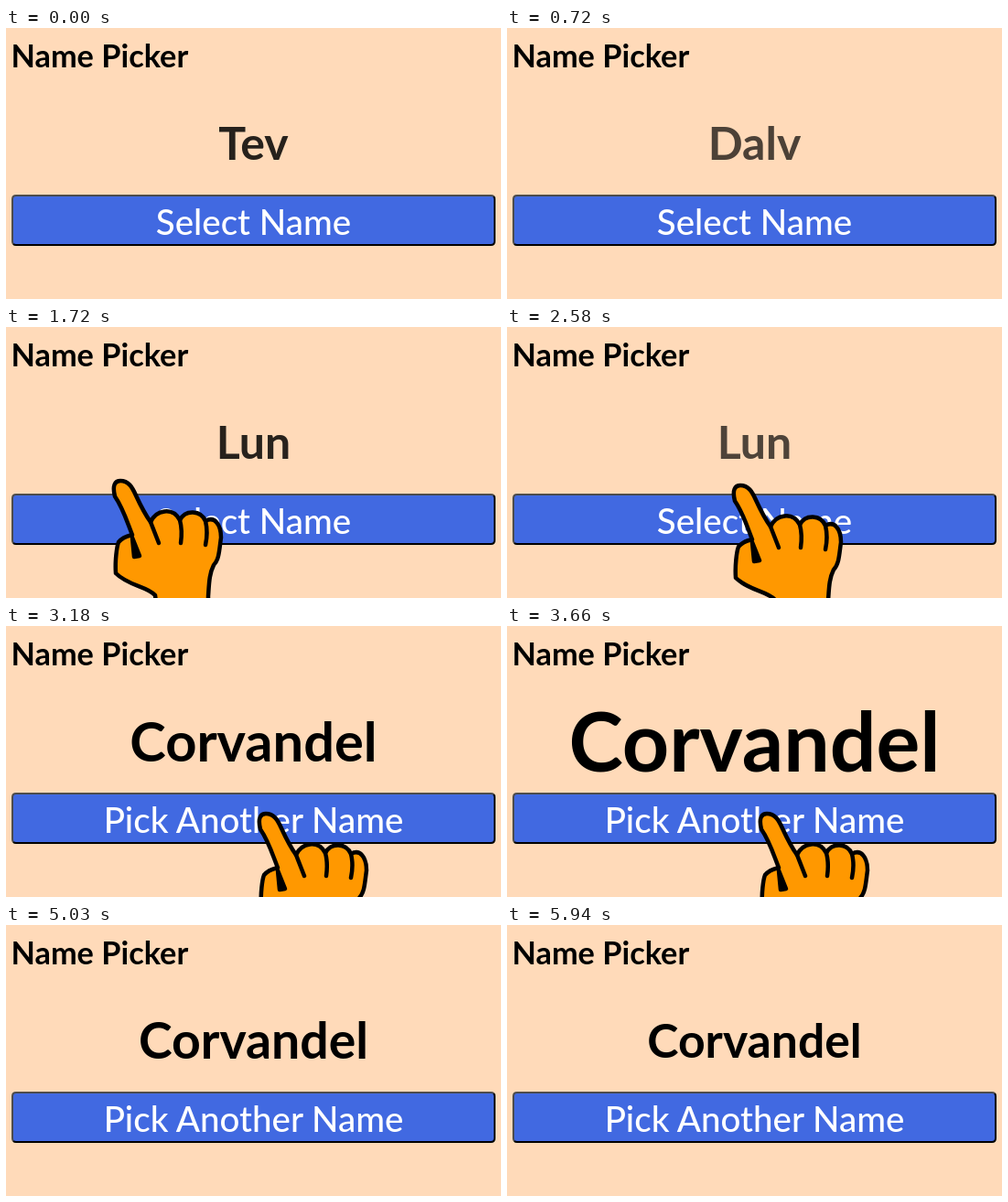
Animation, 541 px wide and 296 px high, one loop 5960 ms. Source, as an HTML page:

```html
<!DOCTYPE html>
<html lang="en">
<head>
<meta charset="utf-8">
<title>Name Picker</title>
<style>
  html, body { margin: 0; width: 100%; height: 100%; overflow: hidden; background: #ffdab9; }
  svg { display: block; width: 541px; height: 296px; font-family: Lato, sans-serif; }
  .bold { font-weight: 700; }
  .mid { text-anchor: middle; }
</style>
</head>
<body>
<svg viewBox="0 0 541 296">
  <text class="bold" x="5.5" y="43" font-size="34.3">Name Picker</text>
  <g id="zoom"><text id="name" class="bold mid" y="19" font-size="50"></text></g>

  <rect x="7" y="183" width="527" height="54" rx="4" fill="#4169e1"/>
  <g fill="none" stroke-width="2">
    <path id="topEdge" d="M8 236 Q7 235 7 233 V187 Q7 183 11 183 H530 Q532 183 533 184"/>
    <path id="bottomEdge" d="M533 184 Q534 185 534 187 V233 Q534 237 530 237 H11 Q9 237 8 236"/>
  </g>
  <text id="label" class="mid" x="270.5" y="226" font-size="38.5" font-weight="500" fill="#fff"></text>

  <g id="hand" stroke="#000" stroke-width="4.5" stroke-linejoin="round" stroke-linecap="round">
    <path fill="#ff9800" d="M3 19 C0 7 3 2 9 2 C18 2 22 9 26 18 C32 31 37 40 42 47
      C48 34 66 30 74 45 C80 33 97 34 102 46 C112 40 119 50 119 64 C117 78 117 88 111 94
      C106 104 106 114 105 128 V165 H52 L47 127 C38 117 18 117 4 103 C3 90 5 74 7 69
      C12 63 18 62 22 61 C16 46 12 32 3 19Z"/>
    <path fill="none" d="M42 47 L51 70 M74 45 Q77 56 75 70 M102 46 Q105 58 102 72"/>
    <path d="M22 64 L30 84 L24 85Z"/>
  </g>
</svg>
<script>
const LOOP = 5960, PRESS = 3030, CLICK = 3090;
const PULSE = 945, FADE = 932, FIRST_SWAP = 396;
const names = ['Tev', 'Dalv', 'Lun', 'Lun'], winner = 'Corvandel';
const $ = id => document.getElementById(id);

// Stops of the hand: time, x, y
const stops = [
  [760, 110, 300], [1340, 372, 260], [1720, 116, 166], [2110, 378, 73],
  [2580, 246, 171], [3000, 275, 203], [3690, 275, 203], [4420, 300, 302]
];

// Triangle wave: 0 at whole numbers, 1 halfway between
const wave = u => 1 - Math.abs(2 * (u - Math.floor(u)) - 1);

function handAt(t) {
  const i = Math.max(0, stops.findLastIndex(s => s[0] <= t));
  const a = stops[i], b = stops[i + 1] || a;
  const u = Math.min(1, Math.max(0, (t - a[0]) / (b[0] - a[0] || 1)));
  const ease = u * u * (3 - 2 * u);
  return [1, 2].map(k => a[k] + (b[k] - a[k]) * ease);
}

function draw(t) {
  const picked = t >= CLICK, pressed = t >= PRESS && !picked;
  const swaps = (t - FIRST_SWAP) / FADE;
  const scale = picked ? 1 + wave((t - CLICK) / PULSE) : 1;

  $('name').textContent = picked ? winner : names[Math.floor(swaps) + 1];
  $('name').style.opacity = picked ? 1 : wave(swaps);
  $('zoom').setAttribute('transform', `translate(270.5 125) scale(${scale})`);
  $('label').textContent = picked ? 'Pick Another Name' : 'Select Name';
  $('topEdge').setAttribute('stroke', pressed ? '#000' : '#4c4c4c');
  $('bottomEdge').setAttribute('stroke', pressed ? '#4c4c4c' : '#000');
  $('hand').setAttribute('transform', `translate(${handAt(t)})`);
}

const start = performance.now();
function tick() {
  draw((performance.now() - start) % LOOP);
  requestAnimationFrame(tick);
}
tick();
</script>
</body>
</html>
```
